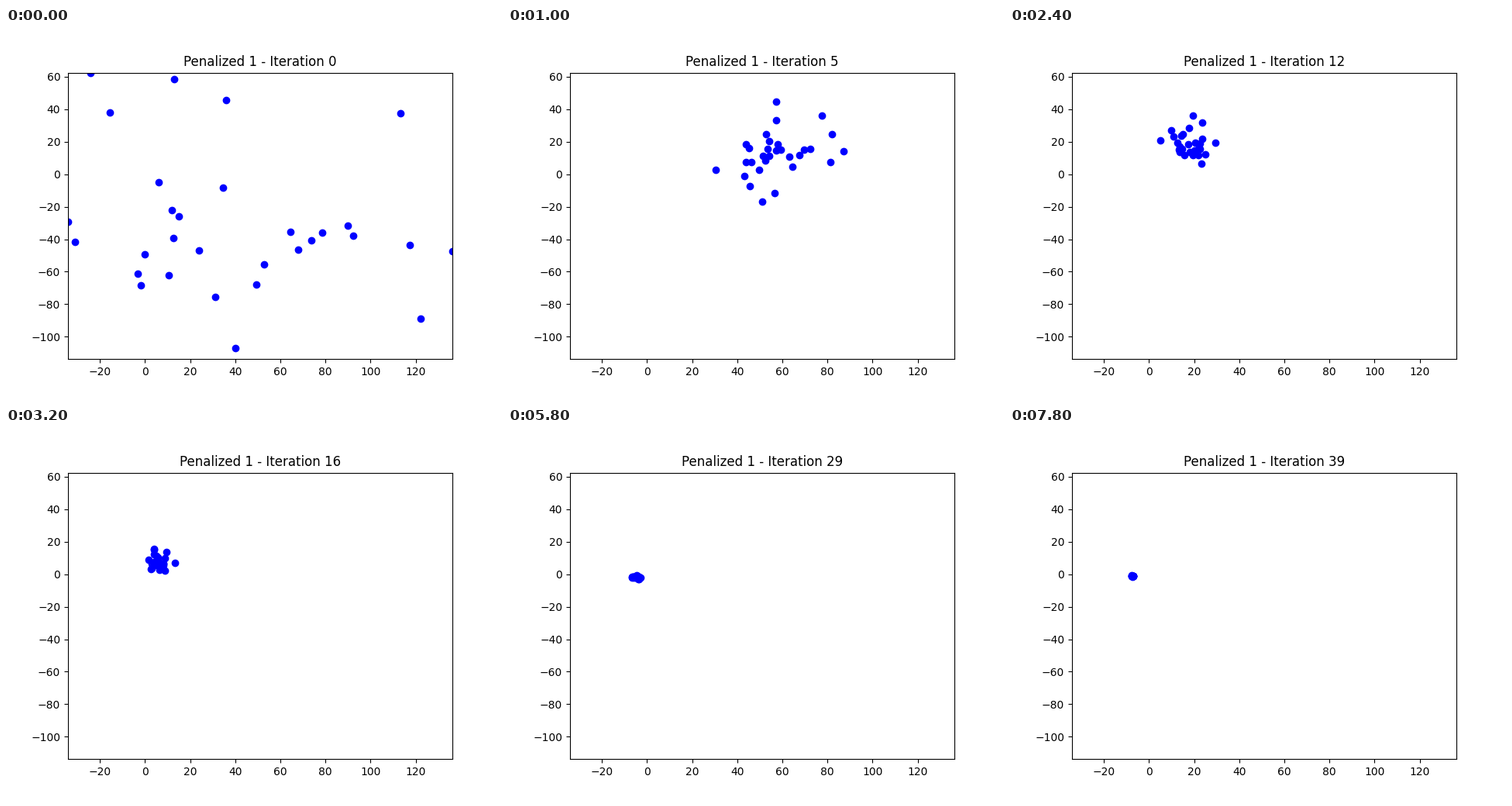
A matplotlib script that plays this animation: 640 by 480 pixels, repeating every 8000 ms.

```python
import numpy as np
import matplotlib.pyplot as plt
from matplotlib.animation import FuncAnimation

W, H, DPI = 640, 480, 100
COUNT = 30
STEPS, STEP_MS = 40, 200

# Iteration, then middle, lowest and highest corner of the swarm.
KEYS = np.array([
    (0, 33, -40, -34.1, -107, 136.2, 62.4),
    (5, 55, 13, 30.3, -17, 87, 44.5),
    (9, 31, 25, 19.5, 3, 46, 33.5),
    (12, 19, 16, 5, 6.5, 29.5, 36),
    (21, -3, -2, -8, -5.5, 1, 1),
    (29, -4.6, -1.8, -6.5, -3, -3, -0.8),
    (39, -7.3, -1.1, -7.7, -1.4, -7, -0.8),
])
times, mids = KEYS[:, 0], KEYS[:, 1:3]
below = mids - KEYS[:, 3:5]
above = KEYS[:, 5:7] - mids
slopes = np.gradient(mids, times, axis=0)


def cloud(rng):
    """Heavy-tailed scatter that just fills -1 to 1 on both axes."""
    z = rng.laplace(size=(COUNT, 2))
    z -= np.median(z, axis=0)
    return np.where(z < 0, z / -z.min(axis=0), z / z.max(axis=0))


rng = np.random.default_rng(4)
clouds = [cloud(rng) for _ in KEYS]


def middle(i, u):
    """Cubic Hermite path of the swarm's middle."""
    span = times[i + 1] - times[i]
    return ((1 + 2 * u) * (1 - u) ** 2 * mids[i]
            + u * (1 - u) ** 2 * span * slopes[i]
            + u ** 2 * (3 - 2 * u) * mids[i + 1]
            - u ** 2 * (1 - u) * span * slopes[i + 1])


def swarm(step):
    i = min(np.searchsorted(times, step, side="right") - 1, len(times) - 2)
    u = (step - times[i]) / (times[i + 1] - times[i])
    # A circular mix keeps the cloud from collapsing between keys.
    a = u * np.pi / 2
    z = np.cos(a) * clouds[i] + np.sin(a) * clouds[i + 1]
    low, high = (r[i] ** (1 - u) * r[i + 1] ** u for r in (below, above))
    return middle(i, u) + z * np.where(z < 0, low, high)


fig, ax = plt.subplots(figsize=(W / DPI, H / DPI), dpi=DPI)
dots = ax.scatter(*swarm(0).T, color="blue")
ax.set_xlim(-34.12, 136.27)
ax.set_ylim(-113.79, 62.56)
title = ax.set_title("")


def update(step):
    dots.set_offsets(swarm(step))
    title.set_text(f"Penalized 1 - Iteration {step}")
    return dots, title


anim = FuncAnimation(fig, update, frames=STEPS, interval=STEP_MS,
                     repeat=True, repeat_delay=0, blit=False)
plt.show()
```
